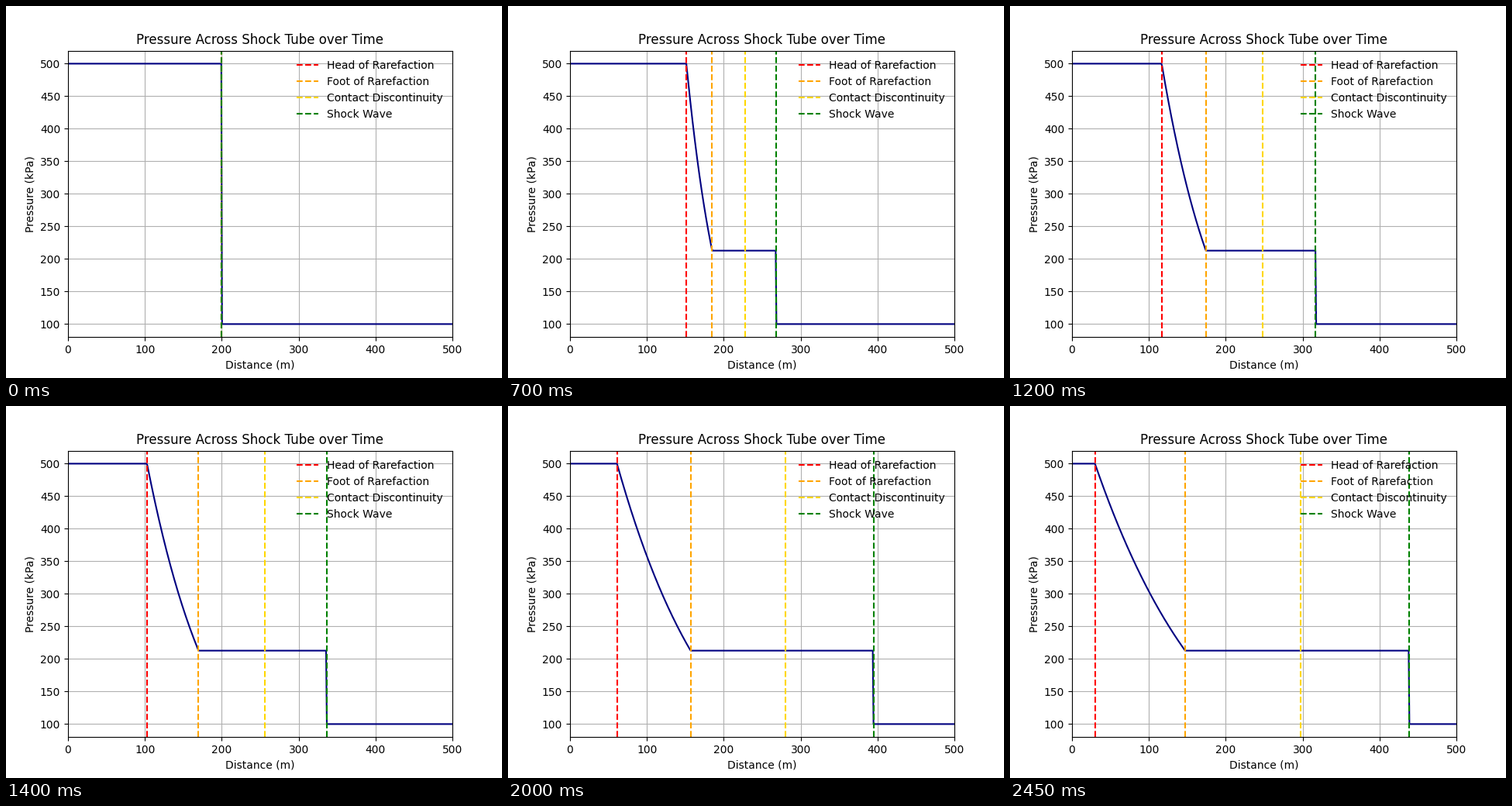
These frames come from a looping animation (640x480 px, 2500 ms). A matplotlib script:

```python
import numpy as np
import matplotlib.pyplot as plt
from matplotlib.animation import FuncAnimation

FRAMES, INTERVAL = 50, 50
DT = 0.01                      # simulated seconds per frame
GAMMA, R, TEMP = 1.4, 287.0, 300.0
P_HIGH, P_LOW = 500.0, 100.0   # kPa
X0, LENGTH = 200.0, 500.0      # diaphragm position and tube length, m
SOUND = np.sqrt(GAMMA * R * TEMP)


def driver_ratio(z):
    """Driver pressure ratio that produces shock strength z."""
    root = np.sqrt(2 * GAMMA * (2 * GAMMA + (GAMMA + 1) * (z - 1)))
    base = 1 - (GAMMA - 1) * (z - 1) / root
    return z * base ** (-2 * GAMMA / (GAMMA - 1))


def shock_strength():
    lo, hi = 1.0, P_HIGH / P_LOW
    for _ in range(60):
        mid = (lo + hi) / 2
        if driver_ratio(mid) < P_HIGH / P_LOW:
            lo = mid
        else:
            hi = mid
    return lo


z = shock_strength()
p_mid = z * P_LOW
shock = SOUND * np.sqrt(1 + (GAMMA + 1) / (2 * GAMMA) * (z - 1))
contact = SOUND / GAMMA * (z - 1) * np.sqrt(
    2 * GAMMA / (GAMMA + 1) / (z + (GAMMA - 1) / (GAMMA + 1)))
foot = contact - (SOUND - (GAMMA - 1) / 2 * contact)

WAVES = [
    ("Head of Rarefaction", "red", -SOUND),
    ("Foot of Rarefaction", "orange", foot),
    ("Contact Discontinuity", "gold", contact),
    ("Shock Wave", "green", shock),
]


def pressure(x, t):
    if t == 0:
        return np.where(x <= X0, P_HIGH, P_LOW)
    v = (x - X0) / t
    fan_v = np.clip(v, -SOUND, foot)
    local = (2 - (GAMMA - 1) * fan_v / SOUND) / (GAMMA + 1)
    fan = P_HIGH * local ** (2 * GAMMA / (GAMMA - 1))
    return np.select([v <= -SOUND, v <= foot, v <= shock],
                     [P_HIGH, fan, p_mid], P_LOW)


fig, ax = plt.subplots(figsize=(6.4, 4.8), dpi=100)
x = np.linspace(0, LENGTH, 500)
curve, = ax.plot(x, pressure(x, 0), color="navy")
markers = [ax.axvline(X0, color=color, linestyle="--", label=label)
           for label, color, _ in WAVES]

ax.set_xlim(0, LENGTH)
ax.set_ylim(80, 520)
ax.set_title("Pressure Across Shock Tube over Time")
ax.set_xlabel("Distance (m)")
ax.set_ylabel("Pressure (kPa)")
ax.grid(True)
ax.legend(loc="upper right", frameon=False)


def update(frame):
    t = frame * DT
    curve.set_ydata(pressure(x, t))
    for marker, (_, _, speed) in zip(markers, WAVES):
        pos = X0 + speed * t
        marker.set_xdata([pos, pos])
    return [curve, *markers]


anim = FuncAnimation(fig, update, frames=FRAMES, interval=INTERVAL,
                     repeat=True, repeat_delay=0, blit=False)
plt.show()
```
